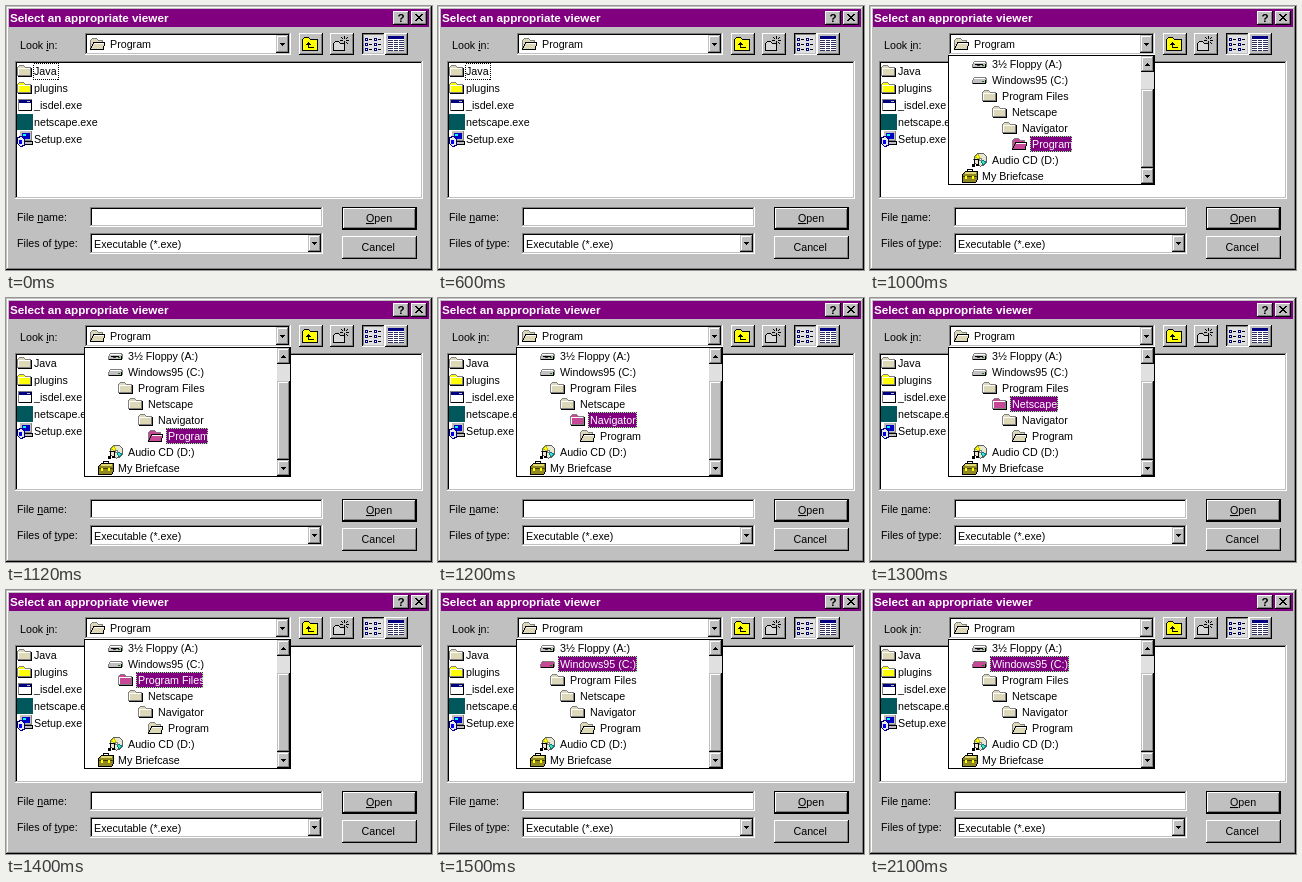
These frames come from a looping animation (426 by 264 pixels, 2500 ms). An HTML page:

```html
<!DOCTYPE html>
<html lang="en">
<head>
<meta charset="utf-8">
<title>File dialog</title>
<style>
html, body { margin: 0; width: 100%; height: 100%; overflow: hidden; background: #c0c0c0; }
svg { display: block; width: 426px; height: 264px; shape-rendering: crispEdges; }
text { font: 10.7px "Liberation Sans", Arial, sans-serif; white-space: pre; }
text.title { font-size: 11.7px; font-weight: bold; }
.u { text-decoration: underline; }
</style>
</head>
<body>
<svg id="stage" viewBox="0 0 426 264"></svg>
<script>
const GREY = '#c0c0c0', DARK = '#808080', PURPLE = '#800080', NAVY = '#000080', PAPER = '#dcd8b8';

const rect = (x, y, w, h, fill) => `<rect x="${x}" y="${y}" width="${w}" height="${h}" fill="${fill}"/>`;
const path = (d, fill = 'none', stroke = '#000') => `<path d="${d}" fill="${fill}" stroke="${stroke}"/>`;
const label = (x, y, s, fill = '#000', cls = '') => `<text x="${x}" y="${y}" fill="${fill}" class="${cls}">${s}</text>`;
const at = (x, y, s) => `<g transform="translate(${x} ${y})">${s}</g>`;
const key = c => `<tspan class="u">${c}</tspan>`;
const dotted = (x, y, w, h, color) =>
  `<rect x="${x + .5}" y="${y + .5}" width="${w - 1}" height="${h - 1}" fill="none" stroke="${color}" stroke-dasharray="1"/>`;

// Two-pixel bevel: outer and inner top-left / bottom-right colours
const bevel = (x, y, w, h, tl, br, tl2, br2, fill) =>
  rect(x, y, w, h, br) + rect(x, y, w - 1, h - 1, tl) +
  rect(x + 1, y + 1, w - 2, h - 2, br2) + rect(x + 1, y + 1, w - 3, h - 3, tl2) +
  rect(x + 2, y + 2, w - 4, h - 4, fill);
const raised = (x, y, w, h) => bevel(x, y, w, h, '#fff', '#000', GREY, DARK, GREY);
const scrollPart = (x, y, w, h) => bevel(x, y, w, h, GREY, '#000', '#fff', DARK, GREY);
const sunk = (x, y, w, h) => bevel(x, y, w, h, DARK, '#fff', '#000', GREY, '#fff');
const pressed = (x, y, w, h) => bevel(x, y, w, h, '#000', '#fff', DARK, GREY, '#e0e0e0');

// Small black triangle; dir 1 points down, -1 up
const arrow = (x, y, dir) => [0, 1, 2].map(i => rect(x - 2 + i, y + dir * i, 5 - 2 * i, 1, '#000')).join('');
const arrowButton = (x, y, w, h, dir = 1) =>
  scrollPart(x, y, w, h) + arrow(x + (w >> 1), y + (h >> 1) - dir, dir);

const icons = {
  folder: (c = PAPER) =>
    path('M.5 12.5V4.5L2.5 2.5H6.5L8.5 4.5H13.5V12.5Z', c, DARK) +
    path('M1.5 12V5.5H13', 'none', '#fff') + path('M1 13.5H14.5V5'),
  open: (c = PAPER) =>
    path('M.5 12.5V4.5L2.5 2.5H6.5L8.5 4.5H12.5V6.5', c, DARK) +
    path('M.5 13.5L3.5 6.5H14.5L13.5 13.5Z', c) + path('M4 7.5H14', 'none', '#fff'),
  drive: (c = GREY) =>
    path('M.5 8.5L2.5 5.5H13.5L14.5 7.5V10.5L12.5 11.5H.5Z', c, DARK) +
    path('M2 6.5H13', 'none', c === GREY ? '#fff' : c) + path('M1 11.5H13.5V8') + rect(10, 9, 2, 1, '#008000'),
  floppy: () => icons.drive() + rect(3, 8, 8, 1, '#000') + rect(5, 9, 3, 1, '#404040'),
  disc: () =>
    '<circle cx="8.5" cy="7.5" r="6.5" fill="#e8e8d0" stroke="#606060"/>' +
    path('M8.5 7.5L3 5L6 2Z', '#ffff00', '#c0c000') + path('M8.5 7.5L14 10L11 13Z', '#40e0d0', '#008080') +
    '<circle cx="8.5" cy="7.5" r="1.5" fill="#fff" stroke="#808080"/>' +
    path('M2.5 14V7.5H6.5V13') + rect(0, 12, 3, 3, '#000') + rect(4, 12, 3, 2, '#000'),
  briefcase: () =>
    path('M5.5 5V1.5H10.5V5') + path('M.5 14.5V6.5L3.5 3.5H15.5V11.5L13.5 14.5Z', '#908820') +
    rect(3, 4, 11, 2, '#e0d870') + path('M1 8.5H15', 'none', '#404000') +
    rect(3, 8, 2, 3, '#ffff00') + rect(10, 8, 2, 3, '#ffff00'),
  window: () =>
    rect(1, 2, 14, 12, DARK) + rect(2, 3, 13, 11, '#000') + rect(2, 3, 12, 10, '#fff') +
    rect(2, 3, 12, 3, NAVY) + rect(10, 4, 3, 1, GREY),
  square: () => rect(0, 0, 16, 16, '#00585c'),
  setup: () =>
    rect(3, 0, 12, 10, DARK) + rect(3, 0, 11, 9, GREY) + rect(5, 2, 8, 6, '#0000c0') +
    rect(6, 3, 3, 2, '#00ffff') + path('M6.5 10.5H15.5V13.5H6.5Z', GREY) +
    path('M.5 6.5L4.5 5.5L7.5 8.5V14.5L3.5 15.5L.5 12.5Z', '#e8e8e8', NAVY) + rect(2, 9, 3, 4, '#0000ff'),
};

const files = [['folder', 'Java'], ['folder', 'plugins', '#ffff00'], ['window', '_isdel.exe'],
  ['square', 'netscape.exe'], ['setup', 'Setup.exe']];

// icon, text, icon x, highlight width
const places = [
  ['floppy', '3½ Floppy (A:)', 102], ['drive', 'Windows95 (C:)', 102, 79],
  ['folder', 'Program Files', 112, 67], ['folder', 'Netscape', 122, 48],
  ['folder', 'Navigator', 132, 49], ['open', 'Program', 142, 42],
  ['disc', 'Audio CD (D:)', 102], ['briefcase', 'My Briefcase', 92],
];

function toolbar() {
  const up = path('M.5 14.5V3.5L2.5 1.5H6.5L8.5 3.5H15.5V14.5Z', '#ffff00') +
    path('M6.5 6V11.5H12') + rect(5, 7, 3, 1, '#000') + rect(4, 8, 5, 1, '#000');
  const fresh = path('M.5 14.5V7.5L2.5 5.5H5.5L7.5 7.5H11.5V14.5Z', '#d8d8d8') +
    path('M11.5 0V3M11.5 5V7M7 4.5H10M13 4.5H16M8 1L10 3M15 1L13 3M13 6L15 8');
  let list = '', details = rect(0, 0, 16, 15, '#fff') + rect(0, 0, 16, 3, NAVY);
  for (let i = 0; i < 6; i++) {
    const x = i % 2 * 9, y = (i >> 1) * 5;
    list += rect(x, y, 3, 3, NAVY) + rect(x + 1, y + 1, 1, 1, '#fff') + rect(x + 4, y + 1, 3, 1, '#000');
    details += rect(0, 4 + i * 2, 16, 1, '#303060');
  }
  details += rect(5, 3, 1, 12, '#fff') + rect(10, 3, 1, 12, '#fff');
  return raised(293, 27, 24, 22) + at(296, 30, up) +
    raised(324, 27, 24, 22) + at(327, 30, fresh) +
    pressed(356, 27, 23, 22) + at(359, 32, list) +
    raised(379, 27, 23, 22) + at(382, 30, details);
}

function dialog() {
  return bevel(0, 0, 426, 264, GREY, '#000', '#fff', DARK, GREY) +
    rect(3, 3, 420, 18, PURPLE) + label(4, 16, 'Select an appropriate viewer', '#fff', 'title') +
    raised(387, 5, 16, 14) + label(391.5, 16, '?', '#000', 'title') +
    raised(405, 5, 16, 14) +
    [0, 1, 2, 3, 4, 5, 6].map(i => rect(409 + i, 8 + i, 2, 1, '#000') + rect(415 - i, 8 + i, 2, 1, '#000')).join('') +
    label(14, 43, `Look ${key('i')}n:`) +
    sunk(79, 27, 206, 22) + at(84, 30, icons.open()) + label(104, 42, 'Program') + arrowButton(270, 29, 13, 18) +
    toolbar() +
    sunk(9, 55, 408, 138) +
    files.map(([icon, name, color], i) =>
      at(11, 57 + i * 17, icons[icon](color)) + label(28, 69 + i * 17, name)).join('') +
    label(11, 215, `File ${key('n')}ame:`) + sunk(84, 201, 233, 20) +
    label(11, 241, `Files of ${key('t')}ype:`) + sunk(84, 227, 233, 21) +
    label(88, 242, 'Executable (*.exe)') + arrowButton(302, 229, 13, 17) +
    rect(336, 201, 75, 23, '#000') + raised(337, 202, 73, 21) + label(360, 216, `${key('O')}pen`) +
    raised(336, 230, 75, 23) + label(355.5, 245, 'Cancel');
}

function dropdown(selected) {
  const rows = places.map(([icon, name, x, w], i) => {
    const y = 50 + i * 16, on = i === selected;
    const mark = on ? rect(x + 18, y, w, 16, PURPLE) + dotted(x + 18, y, w, 16, '#7fff7f') : '';
    return at(x, y, icons[icon](on ? '#c84898' : undefined)) + mark +
      label(x + 20, y + 12, name, on ? '#fff' : '#000');
  }).join('');
  return rect(78, 49, 207, 130, '#000') + rect(79, 50, 205, 128, '#fff') + rows +
    rect(271, 50, 13, 128, '#e0e0e0') + arrowButton(271, 50, 13, 16, -1) +
    scrollPart(271, 83, 13, 79) + arrowButton(271, 162, 13, 16);
}

const stage = document.getElementById('stage'), base = dialog();
let shown;

function frame(now) {
  const t = now % 2500;
  // The selection climbs from the deepest folder to the drive
  const row = t < 1000 ? 0 : t < 1200 ? 5 : Math.max(1, 4 - Math.floor((t - 1200) / 100));
  if (row !== shown) {
    shown = row;
    stage.innerHTML = base + (row ? dropdown(row) : dotted(27, 57, 26, 17, '#000'));
  }
  requestAnimationFrame(frame);
}
frame(performance.now());
</script>
</body>
</html>
```
